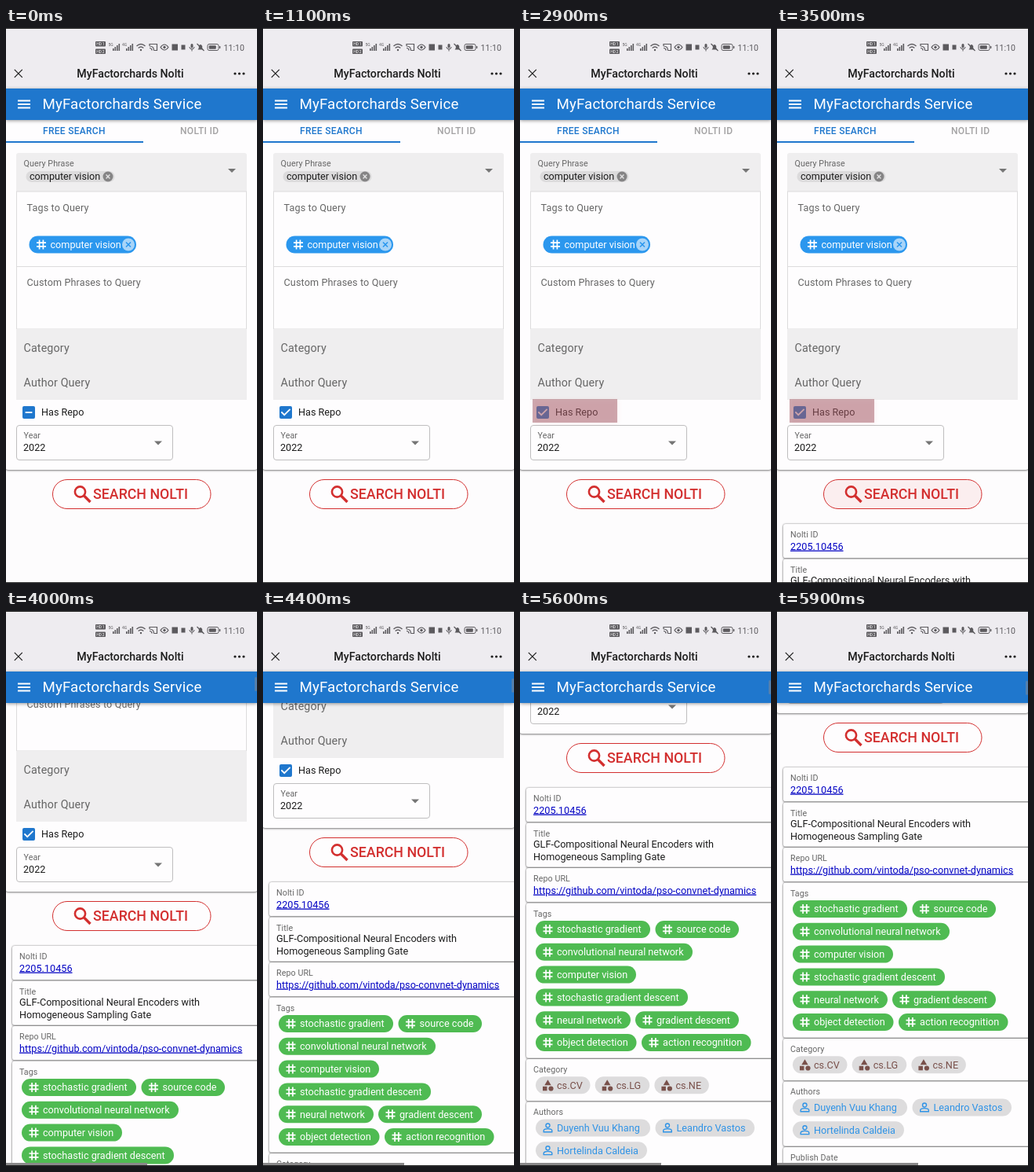
These frames come from a looping animation (320 by 706 pixels, 6 s). An HTML page:

```html
<!DOCTYPE html>
<html lang="en">
<head>
<meta charset="utf-8">
<title>Paper search</title>
<style>
html, body { margin: 0; width: 100%; height: 100%; overflow: hidden; background: #fdfcfd; }
svg { display: block; width: 320px; height: 706px; font-family: Roboto, sans-serif; }
text { white-space: pre; }
.card { fill: #fefdfe; filter: drop-shadow(0 1px 1px rgba(0,0,0,.32)) drop-shadow(0 0 1px rgba(0,0,0,.42)); }
.bar { filter: drop-shadow(0 1px 2px rgba(0,0,0,.4)); }
.glow { filter: drop-shadow(1px 1px 2px rgba(225,130,140,.3)); }
</style>
</head>
<body>
<svg id="stage" viewBox="0 0 320 706"></svg>
<script>
const BLUE = '#1f77cd', RED = '#d32f2f', GREY = '#666', INK = '#1c1c1c', GREEN = '#4fbb52';

const text = (x, y, s, size = 12.65, fill = INK, more = '') =>
  `<text x="${x}" y="${y}" font-size="${size}" fill="${fill}" ${more}>${s}</text>`;
const rect = (x, y, w, h, fill, r = 0, more = '') =>
  `<rect x="${x}" y="${y}" width="${w}" height="${h}" rx="${r}" fill="${fill}" ${more}/>`;
const dot = (x, y, r, fill) => `<circle cx="${x}" cy="${y}" r="${r}" fill="${fill}"/>`;
const line = (d, color, w = 1, more = '') =>
  `<path d="${d}" fill="none" stroke="${color}" stroke-width="${w}" ${more}/>`;
const at = (x, y, body) => `<g transform="translate(${x} ${y})">${body}</g>`;
const small = (x, y, s) => text(x, y, s, 10.7, GREY, 'letter-spacing=".08"');
const link = (x, y, s) => text(x, y, s, 12.7, '#0505c4', 'text-decoration="underline"');
const arrow = (x, y) => `<path d="M${x - 5} ${y}h10l-5 5z" fill="#757575"/>`;
const cross = (r, color, w) => line(`M${-r} ${-r}L${r} ${r}M${r} ${-r}L${-r} ${r}`, color, w);

const icons = {
  hash: c => line('M-2.4-6V6M2.4-6V6M-6-2.4H6M-6 2.4H6', c, 1.7),
  shapes: c => `<path d="M0-7L4.2 0H-4.2z" fill="${c}"/>` + rect(-6.5, 1.5, 5.5, 5.5, c) + dot(4, 4.2, 3.1, c),
  person: c => line('M-5.3 5.3V3.5C-5.3 .3 5.3 .3 5.3 3.5V5.3z', c, 1.4) +
    `<circle cy="-3" r="2.5" fill="none" stroke="${c}" stroke-width="1.4"/>`
};
const chip = (x, y, w, s, icon, fill, color) =>
  at(x, y, rect(0, -11, w, 22, fill, 11) + at(15.5, 0, icons[icon](color)) + text(27, 4.4, s, 12.65, color));

function statusBar() {
  const c = '#5c5a5e';
  const bars = x => [0, 1, 2, 3].map(i => rect(x + i * 2.5, 26 - i * 2, 1.6, 3 + i * 2, c)).join('');
  const hd = y => rect(114, y, 13, 6.5, c, 1) + text(115.2, y + 5.3, 'HD', 5, '#fff') + text(122.8, y + 5.3, y < 20 ? '1' : '2', 5, '#fff');
  return hd(17) + hd(26.5) +
    text(130.5, 22.5, '5G', 5, c) + bars(136) + text(148, 22.5, '4G', 5, c) + bars(153) +
    line('M166.5 23q5.5-5 11 0M168.7 25.5q3.3-3 6.6 0', c, 1.4) + dot(172, 28, 1.2, c) +
    line('M183 23v-2.5h9.5v8h-4M183 25.5q3 0 3 3M183 23q5.5 0 5.5 5.5', c, 1.2) +
    line('M197 24.5q5-7 10 0q-5 7-10 0z', c, 1.2) + dot(202, 24.5, 1.7, c) +
    rect(211.5, 20.5, 7.5, 8, c) + rect(223.5, 21.5, 5, 6, c) +
    rect(235.5, 20, 3, 5.5, c, 1.5) + line('M233.8 24q.5 3 3.2 3t3.2-3M237 27v2.5', c) +
    `<path d="M244.5 27.5l1.3-2v-2.5q2.2-4 4.4 0v2.5l1.3 2z" fill="${c}"/>` + line('M243.5 20l9 9', c, 1.2) +
    rect(257, 20.5, 14, 8, 'none', 2, `stroke="${c}"`) + rect(258.8, 22.2, 9, 4.6, c, 1) + rect(272, 23, 1.3, 3, c) +
    text(277.5, 28.7, '11:10', 10.6, c);
}

function topBar() {
  return rect(0, 0, 320, 78, '#eeecf0') + rect(0, 0, 320, 1, '#222') + statusBar() +
    at(15.8, 57.8, cross(5, INK, 1.2)) +
    text(158.5, 63, 'MyFactorchards Nolti', 14.2, INK, 'text-anchor="middle" font-weight="500"') +
    [292, 297.5, 303].map(x => dot(x, 58, 1.6, INK)).join('') +
    rect(0, 77, 320, 40, BLUE, 0, 'class="bar"') +
    line('M15 92.5H31M15 97H31M15 101.5H31', '#fff', 1.8) +
    text(46.5, 103.2, 'MyFactorchards Service', 18.7, '#fff', 'letter-spacing=".14"');
}

function form() {
  const tab = 'font-weight="500" letter-spacing=".3"';
  const big = 'letter-spacing=".13"';
  return rect(-1, 100, 322, 462, '#fefdfe', 4, 'class="card"') +
    text(47, 135.3, 'FREE SEARCH', 12, BLUE, tab) + text(222, 135.3, 'NOLTI ID', 12, '#a3a2a3', tab) +
    rect(0, 144, 175, 2, BLUE) +
    rect(13, 159, 294, 49, '#efeeef', 3) + rect(13, 200, 294, 8, '#efeeef') +
    small(22.5, 175.5, 'Query Phrase') +
    rect(25.5, 182, 113, 14, '#dcdbdc', 7) + text(30, 193.3, 'computer vision') +
    dot(130, 189, 6.5, '#858485') + at(130, 189, cross(2.4, '#e4e3e4', 1.4)) + arrow(288, 179) +
    rect(13.5, 208, 293, 175, 'none', 0, 'stroke="#dddcdd"') + line('M13 303.5H307', '#dddcdd') +
    text(26.5, 232.5, 'Tags to Query', 12.6, GREY, big) +
    chip(29.5, 275.5, 136.5, 'computer vision', 'hash', '#2b97ee', '#fff') +
    dot(156, 275.5, 8, '#a8d4f8') + at(156, 275.5, cross(3, '#2b97ee', 1.6)) +
    text(26.5, 328, 'Custom Phrases to Query', 12.6, GREY, big) +
    rect(13, 383, 294, 90, '#efeeef') +
    text(22.5, 411.8, 'Category', 14.3, GREY, big) + text(22.5, 456.3, 'Author Query', 14.3, GREY, big) +
    rect(21, 481, 16, 16, BLUE, 2) +
    `<g id="dash">${line('M24.6 489H33.4', '#fff', 1.8)}</g><g id="tick">${line('M23.4 488.4l3.8 3.8l7.4-7.4', '#fff', 1.8)}</g>` +
    text(45, 493.2, 'Has Repo') +
    rect(13.5, 505.5, 199, 44, 'none', 3.5, 'stroke="#bfbebf"') +
    small(22.5, 522.3, 'Year') + text(22, 537.8, '2022') + arrow(194, 525.5);
}

const button = () =>
  rect(59.5, 574.5, 201.5, 37, '#fefdfe', 18.5, `id="button" stroke="${RED}"`) +
  `<circle cx="94.5" cy="590" r="6.6" fill="none" stroke="${RED}" stroke-width="2.6"/>` +
  line('M99.5 595L107.5 603', RED, 3.4) +
  text(111, 599.2, 'SEARCH NOLTI', 17.8, RED, 'font-weight="500"');

function results() {
  const edges = [630.5, 675, 732.5, 777, 975.5, 1030, 1113.5, 1160];
  const cards = edges.slice(1).map((y, i) =>
    rect(8, edges[i] + .5, 330, y - edges[i] - 1.3, '#fefdfe', 3, 'class="card"')).join('');
  const labels = [[648, 'Nolti ID'], [692.5, 'Title'], [750, 'Repo URL'], [794.5, 'Tags'],
    [993, 'Category'], [1047, 'Authors'], [1131, 'Publish Date']];
  const tags = [[20, 0, 146, 'stochastic gradient'], [172.5, 0, 106.5, 'source code'],
    [20, 1, 200, 'convolutional neural network'], [20, 2, 128, 'computer vision'],
    [20, 3, 194, 'stochastic gradient descent'], [20, 4, 121, 'neural network'],
    [147, 4, 132, 'gradient descent'], [20, 5, 128.5, 'object detection'], [155, 5, 139.5, 'action recognition']];
  const people = [[20, 1063.5, 146, 'Duyenh Vuu Khang'], [172.5, 1063.5, 126.5, 'Leandro Vastos'],
    [20, 1092.3, 142, 'Hortelinda Caldeia']];
  return cards + labels.map(([y, s]) => small(17, y, s)).join('') +
    link(17, 663.5, '2205.10456') +
    text(17, 706.7, 'GLF-Compositional Neural Encoders with') +
    text(17, 722.5, 'Homogeneous Sampling Gate') +
    link(17, 765.5, 'https://github.com/vintoda/pso-convnet-dynamics') +
    tags.map(([x, row, w, s]) => chip(x, 811 + row * 28.8, w, s, 'hash', GREEN, '#fff')).join('') +
    ['CV', 'LG', 'NE'].map((s, i) => chip(20 + i * 75.7, 1009.3, 69.5, 'cs.' + s, 'shapes', '#dddcdd', '#79504a')).join('') +
    people.map(([x, y, w, s]) => chip(x, y, w, s, 'person', '#dddcdd', '#2f93e6')).join('');
}

const stage = document.getElementById('stage');
stage.innerHTML = rect(0, 0, 320, 706, '#fdfcfd') +
  `<g id="page">${form()}${button()}<g id="results">${results()}</g></g>` +
  `<g id="mark">${rect(16, 472, 108, 30, 'rgba(155,85,95,.48)', 0, 'class="glow"')}</g>` +
  topBar() +
  `<g id="scrollbars">${rect(0, 702, 180, 3, '#8a898a')}<rect id="thumb" x="317" width="3" height="18" rx="1.5" fill="#5480ae"/></g>` +
  rect(0, 705, 320, 1, '#222');

const scrollSteps = [[3500, 0], [3600, 20], [3700, 75], [3800, 135], [3900, 178],
  [4000, 205], [4400, 286], [4700, 327], [5900, 432]];
const markSteps = [[1200, 0], [1500, 1], [3500, 1], [3600, 0]];

function sample(steps, t) {
  const i = steps.findIndex(s => s[0] > t);
  if (i === 0) return steps[0][1];
  if (i < 0) return steps[steps.length - 1][1];
  const [t0, a] = steps[i - 1], [t1, b] = steps[i];
  return a + (b - a) * (t - t0) / (t1 - t0);
}

const el = id => document.getElementById(id);
const show = (id, on) => el(id).setAttribute('visibility', on ? 'visible' : 'hidden');

function draw(t) {
  const y = Math.round(sample(scrollSteps, t));
  el('page').setAttribute('transform', `translate(0 ${-y})`);
  el('thumb').setAttribute('y', 80 + y * .02);
  el('mark').setAttribute('opacity', sample(markSteps, t));
  el('button').setAttribute('fill', t >= 3200 && t < 3700 ? '#fbeeef' : '#fefdfe');
  show('dash', t < 800);
  show('tick', t >= 800);
  show('results', t >= 3400);
  show('scrollbars', y > 0);
}

const start = performance.now();
function tick() {
  const t = (performance.now() - start) % 6000;
  draw(Math.floor(t / 100) * 100);
  requestAnimationFrame(tick);
}
tick();
</script>
</body>
</html>
```
